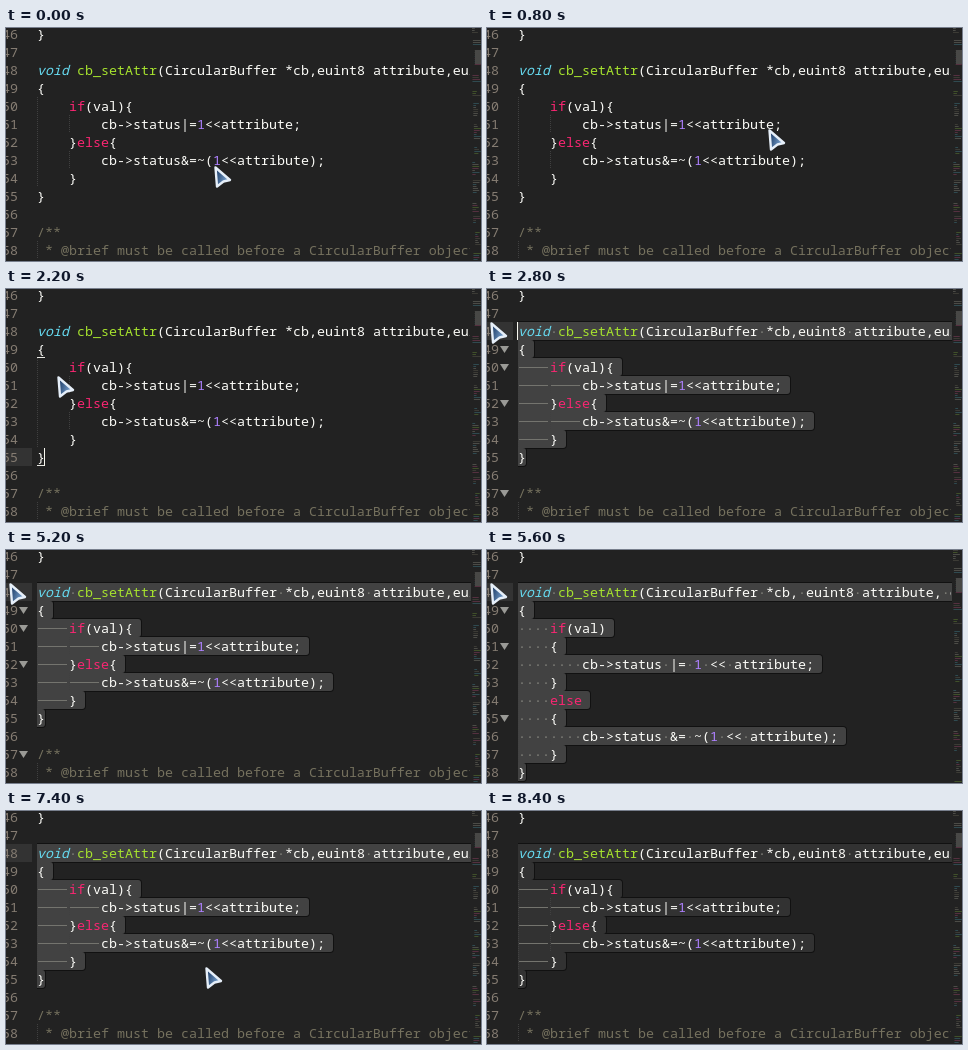
Animation of 475 by 233 pixels, one loop 8.8 s. Source, as an HTML page:

```html
<!DOCTYPE html>
<html lang="en">
<head>
<meta charset="utf-8">
<title>Code formatting</title>
<style>
  html, body { margin: 0; width: 100%; height: 100%; overflow: hidden; background: #222; }
  svg { display: block; }
  text { font: 500 13.333px "Noto Sans Mono", "DejaVu Sans Mono", monospace; white-space: pre;
         font-variant-ligatures: none; fill: #fcfcf8; }
  .num { fill: #857c72; font-weight: 400; }
  .type { fill: #66d9ef; font-style: italic; }
  .func { fill: #a6e22e; }
  .key { fill: #f92672; }
  .lit { fill: #ae81ff; }
  .note { fill: #75715e; font-weight: 400; }
  .space { fill: #83837c; }
  .tab { stroke: #74746e; }
  .guide { stroke: #404040; stroke-dasharray: 1 1; }
  .edge rect { stroke: #111; stroke-width: 2; }
  .fold { fill: #9a9a96; }
</style>
</head>
<body>
<svg width="475" height="233" viewBox="0 0 475 233">
  <defs>
    <clipPath id="page"><rect x="30" width="434" height="233"/></clipPath>
    <clipPath id="chosen"><rect x="31" width="434" height="233"/></clipPath>
    <linearGradient id="steel" x2="1" y2="0.4">
      <stop stop-color="#12305a"/><stop offset="1" stop-color="#7fa9d6"/>
    </linearGradient>
  </defs>
  <rect id="active" width="26" height="18" fill="#333"/>
  <g id="numbers"></g>
  <g id="raw"></g>
  <g id="tidy"></g>
  <path id="match" d="M31 68.5h8M31 176.5h8" stroke="#e8e8e2"/>
  <rect id="caret" width="1" height="18" fill="#f8f8f0"/>
  <g id="map"></g>
  <path id="mouse" d="M1.5 1.5 L16 14 L9.5 15.5 L3 20.5 Z" fill="url(#steel)"
        stroke="#e6eff9" stroke-width="2.4" stroke-linejoin="round"/>
</svg>
<script>
const LOOP = 8800, TICK = 200, FIRST = 46, CHAR = 8, LEFT = 31;
const CLICK = 1400, SELECT = 2400, FORMAT = 5400, UNDO = 7400, BLUR = 8400;
const $ = id => document.getElementById(id);
const rowTop = n => 33 + (n - 48) * 18;

const rawLines = [
  '}', '',
  'void cb_setAttr(CircularBuffer *cb,euint8 attribute,euint8 val)',
  '{',
  '\tif(val){',
  '\t\tcb->status|=1<<attribute;',
  '\t}else{',
  '\t\tcb->status&=~(1<<attribute);',
  '\t}',
  '}', '',
  '/**',
  ' * @brief must be called before a CircularBuffer object'
];
const tidyLines = [
  '}', '',
  'void cb_setAttr(CircularBuffer *cb, euint8 attribute, euint8 val)',
  '{',
  '    if(val)',
  '    {',
  '        cb->status |= 1 << attribute;',
  '    }',
  '    else',
  '    {',
  '        cb->status &= ~(1 << attribute);',
  '    }',
  '}'
];

const escape = s => s.replace(/&/g, '&amp;').replace(/</g, '&lt;').replace(/>/g, '&gt;');
const widen = s => s.replace(/\t/g, '    ');
const indent = s => widen(s || '').search(/\S|$/);
const text = (x, n, body, cls = '') =>
  `<text x="${x}" y="${rowTop(n) + 14}" class="${cls}" xml:space="preserve">${body}</text>`;

const kinds = { void: 'type', cb_setAttr: 'func', if: 'key', else: 'key', 1: 'lit' };
const paint = line => line.split(/\b(void|cb_setAttr|if|else|1)\b/)
  .map((s, i) => i % 2 ? `<tspan class="${kinds[s]}">${s}</tspan>` : escape(s)).join('');

function codeRow(line, n) {
  const note = /^(\/\*| \*)/.test(line);
  let out = '';
  for (let col = 0; col < indent(line); col += 4)
    out += `<path class="guide" d="M${LEFT + col * CHAR + 0.5} ${rowTop(n)}v18"/>`;
  return out + text(LEFT, n, note ? escape(line) : paint(widen(line)), note ? 'note' : '');
}

// Selected rows run from line 48 to the closing brace of the function.
function selection(lines) {
  const last = FIRST + lines.lastIndexOf('}');
  let rects = '', marks = '';
  for (let n = 48; n <= last; n++) {
    const line = lines[n - FIRST], wide = widen(line);
    const end = LEFT + CHAR * (wide.length + (n < last ? 1 : 0));
    rects += `<rect x="20" y="${rowTop(n)}" width="${end - 20}" height="18" rx="3"/>`;
    const tabs = line.match(/^\t*/)[0].length;
    for (let i = 0; i < tabs; i++)
      marks += `<path class="tab" d="M${LEFT + 32 * i + 1} ${rowTop(n) + 9.5}h29"/>`;
    marks += text(LEFT, n, wide.replace(/./g, (c, i) =>
      c === ' ' && i >= tabs * 4 ? '·' : ' '), 'space');
  }
  return `<g class="sel" clip-path="url(#chosen)"><g class="edge">${rects}</g>` +
         `<g class="fill">${rects}</g>${marks}</g>`;
}

// A row can be folded when the next one is indented further.
const folds = lines => lines.map((line, i) => indent(lines[i + 1]) > indent(line)
  ? `<path class="fold" d="M13 ${rowTop(FIRST + i) + 6}h9l-4.5 7z"/>` : '').join('');

const sheet = lines => selection(lines) + '<g clip-path="url(#page)">' +
  lines.map((line, i) => codeRow(line, FIRST + i)).join('') + '</g>' + folds(lines);

// Overview strip: seeded clusters of dim specks.
function overview() {
  let seed = 29, out = '';
  const rnd = n => (seed = seed * 16807 % 2147483647) / 2147483647 * n;
  const inks = ['#4c4c47', '#3c3b35', '#2f4a50', '#40502a', '#553040'];
  for (let y = -8; y < 236; y += 3 + rnd(6)) {
    const dent = rnd(4);
    for (let rows = 2 + rnd(6); rows > 0; rows--, y += 2)
      out += `<rect x="${466 + dent}" y="${Math.round(y)}" width="${2 + rnd(7 - dent)}" height="1"
        fill="${inks[Math.floor(rnd(inks.length))]}"/>`;
  }
  return out + '<rect x="469" y="22" width="6" height="14" fill="#484846"/>';
}

$('raw').innerHTML = sheet(rawLines);
$('tidy').innerHTML = sheet(tidyLines);
$('numbers').innerHTML = rawLines.map((_, i) => text(-4, FIRST + i, FIRST + i, 'num')).join('');
$('map').innerHTML = overview();

// Pointer key points: time, x, y.
const path = [[0, 208, 138], [400, 225, 43], [800, 281, 101], [1200, 53, 164], [1600, 47, 181],
  [2000, 98, 141], [2400, 3, 33], [6400, 3, 33], [6800, 114, 100], [7200, 199, 156],
  [7600, 199, 156], [8400, -30, 160], [LOOP, -30, 160]];

function pointer(t) {
  const i = path.findIndex(p => p[0] > t);
  const [a, b] = [path[i - 1], path[i]];
  const k = (t - a[0]) / (b[0] - a[0]);
  return [1, 2].map(j => Math.round(a[j] + (b[j] - a[j]) * k));
}

const show = (el, on) => { el.style.display = on ? '' : 'none'; };
const all = sel => [...document.querySelectorAll(sel)];
const sels = all('.sel'), fills = all('.fill'), foldMarks = all('.fold');

function draw(now) {
  const t = Math.floor(now % LOOP / TICK) * TICK;
  const tidy = t >= FORMAT && t < UNDO;
  const selected = t >= SELECT, focused = t >= CLICK && t < BLUR;
  const caretTop = rowTop(selected ? 48 : 55);
  const blink = Math.floor((t - 400) / 800) % 2;
  const foldAlpha = t < 7200 ? Math.min(1, Math.max(0, (t - SELECT) / 400)) : 0;

  $('mouse').setAttribute('transform', `translate(${pointer(t).join(' ')})`);
  show($('raw'), !tidy);
  show($('tidy'), tidy);
  sels.forEach(el => show(el, selected));
  fills.forEach(el => el.setAttribute('fill', focused ? '#424242' : '#323232'));
  foldMarks.forEach(el => el.setAttribute('opacity', foldAlpha));
  show($('match'), focused && !selected);
  show($('active'), focused);
  $('active').setAttribute('y', caretTop);
  show($('caret'), focused && (!selected || blink));
  $('caret').setAttribute('x', selected ? 30 : 38);
  $('caret').setAttribute('y', caretTop);
  $('map').setAttribute('transform', `translate(0 ${tidy ? 6 : 0})`);
}

const start = performance.now();
function tick() {
  draw(performance.now() - start);
  requestAnimationFrame(tick);
}
tick();
</script>
</body>
</html>
```
